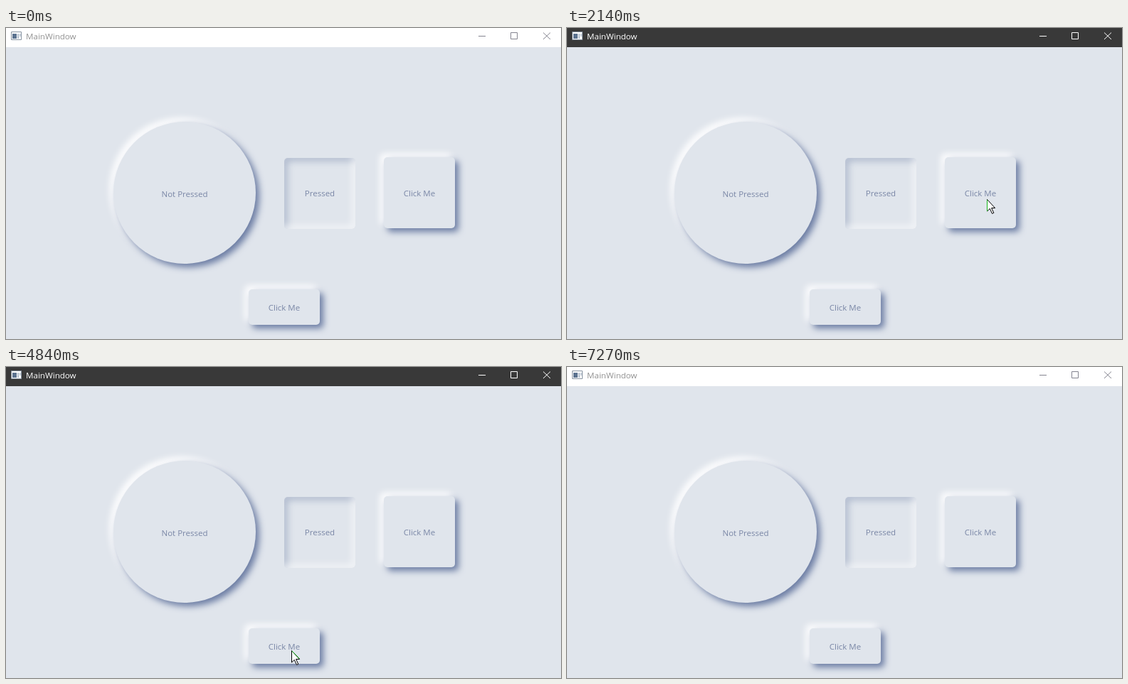
An HTML page for the animation above (7.42 s loop, 780 by 438 pixels).

```html
<!DOCTYPE html>
<html lang="en">
<head>
<meta charset="utf-8">
<title>MainWindow</title>
<style>
  html, body { margin: 0; width: 100%; height: 100%; overflow: hidden; background: #e0e5ec; }
  #stage { position: relative; width: 780px; height: 438px; overflow: hidden; background: #e0e5ec; }
  svg { position: absolute; left: 0; top: 0; }
  text { font-family: "Open Sans", "Noto Sans", sans-serif; }

  .key {
    position: absolute; width: 100px; height: 100px; border-radius: 5px; background: #e0e5ec;
    box-shadow: 5px 5px 10px #6b7ca3, -5px -5px 10px #fff;
  }
  .key.pressed {
    box-shadow: inset -5px -5px 10px rgba(255, 255, 255, .55),
                inset 5px 5px 10px rgba(107, 124, 163, .37);
  }
  #round { left: 151px; top: 132px; width: 200px; height: 200px; border-radius: 50%; }
  #fixed { left: 391px; top: 183px; }
  #square { left: 531px; top: 182px; }
  #wide { left: 341px; top: 368px; height: 50px; }

  #labels { font-size: 11.5px; fill: #7a87a6; text-anchor: middle; }

  #bar { --back: #fff; --title: #929292; --icon: #84848f; }
  #bar.active { --back: #393939; --title: #fff; --icon: #fff; }
  #bar > rect { fill: var(--back); }
  #bar > text { fill: var(--title); font-size: 11.6px; }
  #controls { fill: none; stroke: var(--icon); }
</style>
</head>
<body>
<div id="stage">
  <div class="key" id="round"></div>
  <div class="key pressed" id="fixed"></div>
  <div class="key" id="square"></div>
  <div class="key" id="wide"></div>

  <svg width="780" height="438" viewBox="0 0 780 438">
    <g id="labels">
      <text x="251" y="238">Not Pressed</text>
      <text x="441" y="237">Pressed</text>
      <text x="581" y="237">Click Me</text>
      <text x="391" y="398">Click Me</text>
    </g>

    <g id="bar">
      <rect width="780" height="27"/>
      <g>
        <path d="M7.5 5.5h14v11h-14z" fill="#fff" stroke="#8793a1"/>
        <path d="M9 8h6v7h-6z" fill="#5c7390"/>
        <path d="M16 8h2v7h-2zM19 8h1.500v4h-1.500z" fill="#b4c0ce"/>
      </g>
      <text x="28" y="16">MainWindow</text>
      <path id="controls" d="M664 11.500h10M709.500 6.500h9v9h-9zM755 6.500l10 9.500M765 6.500l-10 9.500"/>
    </g>

    <g id="pointer">
      <circle id="halo" cx="1" cy="0.500" r="12" fill="#ff0" fill-opacity=".5"/>
      <path d="M.5.5v16.500l3.800-3.600 3.200 7 2.300-1-3.200-6.900h5z" fill="#fff" stroke="#000"/>
      <path id="tint" fill="none" stroke="#17b51c"/>
    </g>
  </svg>
</div>

<script>
const LOOP = 7420;
const el = id => document.getElementById(id);
const within = (t, ranges) => ranges.some(([a, b]) => t >= a && t < b);

// Each move is sampled in a few discrete steps along a quadratic curve.
const moves = [
  { start: 70, end: 210, steps: 3, path: [[676, 450], [671, 403], [667, 357]] },
  { start: 520, end: 980, steps: 7, path: [[667, 357], [632, 285], [590, 241]], smooth: true },
  { start: 3310, end: 3920, steps: 9, path: [[590, 241], [440, 480], [401, 399]], smooth: true },
  { start: 6260, end: 6560, steps: 5, path: [[401, 399], [520, 378], [716, 445]] }
];

const halos = [[1300, 2140], [2450, 3080], [4230, 4840], [5160, 5860]];
const squarePresses = [[1380, 2140], [2450, 3080]];
const widePresses = [[4230, 4840], [5160, 5860]];
const leftTints = [[2140, 2450], [3080, 3310]];
const rightTints = [[4840, 5160], [5860, 6260]];

function pointerAt(t) {
  const move = moves.filter(m => t >= m.start).pop();
  if (!move) return [676, 450];
  const { start, end, steps, path: [a, b, c], smooth } = move;
  const step = Math.floor((t - start) / (end - start) * (steps - 1) + 1e-6) + 1;
  let u = Math.min(1, step / steps);
  if (smooth) u = u * u * (3 - 2 * u);
  const v = 1 - u;
  return [0, 1].map(i => Math.round(v * v * a[i] + 2 * u * v * b[i] + u * u * c[i]));
}

function draw(t) {
  el("bar").classList.toggle("active", t >= 1300 && t < 7270);
  el("square").classList.toggle("pressed", within(t, squarePresses));
  el("wide").classList.toggle("pressed", within(t, widePresses));
  el("halo").style.display = within(t, halos) ? "" : "none";
  el("tint").setAttribute("d",
    within(t, leftTints) ? "M.5 1v16" : within(t, rightTints) ? "M1 1l10.500 11" : "");
  el("pointer").style.display = t >= 70 && t < 6560 ? "" : "none";
  el("pointer").setAttribute("transform", `translate(${pointerAt(t)})`);
}

const origin = performance.now();
function frame() {
  draw((performance.now() - origin) % LOOP);
  requestAnimationFrame(frame);
}
frame();
</script>
</body>
</html>
```
